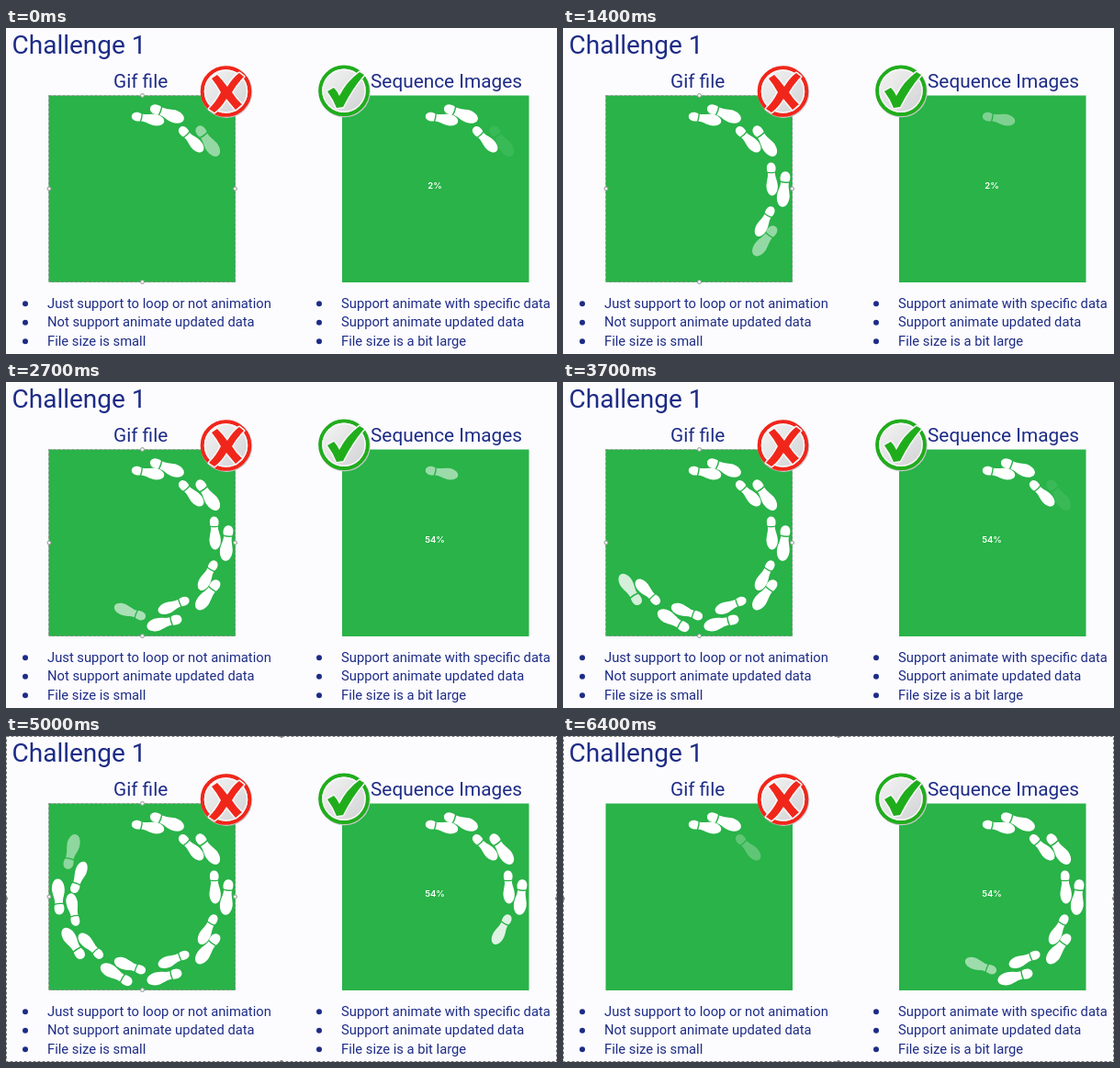
An HTML page that plays this animation: 600 px wide and 355 px high, repeating every 6.5 s.

```html
<!DOCTYPE html>
<html lang="en">
<head>
<meta charset="utf-8">
<title>Challenge 1</title>
<style>
  html, body { margin: 0; width: 100%; height: 100%; overflow: hidden; background: #fcfbfe; }
  svg { display: block; width: 600px; height: 355px; }
  text { font-family: Roboto, sans-serif; fill: #1d2c86; }
  .item { font-size: 14.75px; }
  .head { font-size: 20.8px; }
  .percent { font: 600 9.5px Inter, sans-serif; fill: #fff; text-anchor: middle; }
  .panel { fill: #29b348; }
  .select { fill: none; stroke-dasharray: 3 2; }
</style>
</head>
<body>
<svg viewBox="0 0 600 355">
  <defs>
    <g id="foot" fill="#fff">
      <path d="M-8.2-4.4C-12-6-18.4-5.2-18.5 0C-18.4 5-12 5.6-8.2 4.2Q-7.4 0-8.2-4.4Z"/>
      <path d="M-6.8-4.2C-2-4 2-6.8 8-6.8C14-6.8 18.5-4 18.5-.4C18.5 4 12 6.4 6.5 5.9C1 5.2-3 3.4-6.8 4Q-6-.2-6.8-4.2Z"/>
    </g>
    <linearGradient id="disc" x2="1" y2="1">
      <stop offset="0" stop-color="#f6f6f6"/>
      <stop offset="1" stop-color="#cfd0d2"/>
    </linearGradient>
    <path id="cross" d="M224 55L230 51Q236 57 241 64Q247 54 254 49L259 53Q251 61 246 70Q251 78 257 83L250 89Q245 83 240 77Q234 87 227 92L221 88Q229 80 234 70Q229 61 224 55Z"/>
    <path id="check" d="M350 69L357 65Q361 69 363 74Q371 58 385 48L390 51Q377 66 367 86L360 87Q356 77 350 69Z"/>
  </defs>

  <rect width="600" height="355" fill="#fcfbfe"/>
  <text x="6.5" y="28" font-size="28">Challenge 1</text>
  <text class="head" x="117" y="65">Gif file</text>
  <text class="head" x="397" y="65">Sequence Images</text>
  <g id="lists"></g>

  <rect class="panel" x="46.5" y="73.5" width="203.5" height="203.5"/>
  <rect class="panel" x="366" y="73.5" width="203.5" height="203.5"/>
  <g id="left"></g>
  <g id="right" transform="translate(320 0)"></g>
  <text id="percent" class="percent" x="467" y="174.5"></text>

  <g id="panelSelect" stroke="#8f9c92">
    <rect class="select" x="46.5" y="73.5" width="203" height="203"/>
    <g fill="#f4f4f4">
      <circle cx="148.5" cy="73.5" r="2"/><circle cx="148.5" cy="276.5" r="2"/>
      <circle cx="47" cy="175" r="2"/><circle cx="249.5" cy="175" r="2"/>
    </g>
  </g>

  <g id="badges"></g>

  <g id="stageSelect" stroke="#777">
    <rect class="select" x=".5" y=".5" width="599" height="354"/>
    <g fill="#777" stroke="none">
      <circle cx="0" cy="177" r="2"/><circle cx="600" cy="177" r="2"/>
      <circle cx="300" cy="0" r="2"/><circle cx="300" cy="355" r="2"/>
    </g>
  </g>
</svg>
<script>
const LOOP = 6500, STEP = 100, RESTART = 5850, UPDATE = 2650;
const byId = id => document.getElementById(id);

// Each print: centre x, centre y, walking direction in degrees
const prints = [
  [154.5, 99, 11], [175.5, 93, 20], [201.5, 121.5, 47], [220, 123, 54],
  [227, 164.5, 88], [241, 175.5, 95], [219.5, 210.5, 119], [220, 232, 126],
  [182.5, 243, 159], [172.5, 262.5, 165], [135, 250, 201], [120, 260, 210],
  [92.5, 228.5, 227], [73, 226, 237], [73.5, 189, 260], [57, 175, 266],
  [79.5, 154, 291], [71, 126, 284], [109, 109, 328], [112.5, 91, 338]
];

// [time, number of prints shown]; the fraction is the opacity of the newest print
const leftKeys = [[0, 3.5], [1400, 7.5], [2700, 10.6], [3700, 13.8], [4400, 15.8],
  [5600, 19.15], [RESTART, 20], [RESTART, .5], [6400, 2.25], [6500, 2.5]];
const rightKeys = [[0, 3.08], [975, .4], [UPDATE, .4], [3700, 3.08], [4400, 5.25],
  [5600, 8.45], [6400, 10.55], [6500, 10.8]];

function buildPrints(id) {
  byId(id).innerHTML = prints.map(([x, y, angle], i) => {
    const size = i % 2 ? "1.05 -1.08" : ".97 .97";
    return `<use href="#foot" transform="translate(${x} ${y}) rotate(${angle}) scale(${size})"/>`;
  }).join("");
  return [...byId(id).children];
}

function list(x, lines) {
  return lines.map((line, i) => {
    const y = 304.8 + i * 20.5;
    return `<circle cx="${x}" cy="${y - 4.5}" r="3" fill="#1d2c86"/>
      <text class="item" x="${x + 24}" y="${y}">${line}</text>`;
  }).join("");
}

function badge(x, y, color, mark) {
  return `<circle cx="${x + .6}" cy="${y + .8}" r="28.2" fill="#c9c9cb"/>
    <circle cx="${x}" cy="${y}" r="25.8" fill="url(#disc)" stroke="${color}" stroke-width="4"/>
    <circle cx="${x}" cy="${y}" r="23" fill="none" stroke="#f7f7f7" stroke-width="1.4"/>
    <use href="#${mark}" fill="${color}" stroke="#f8f8f8" stroke-width="3" stroke-linejoin="round"/>
    <use href="#${mark}" fill="${color}"/>`;
}

function valueAt(keys, t) {
  let i = keys.length - 2;
  while (i > 0 && keys[i][0] > t) i--;
  const [t0, a] = keys[i], [t1, b] = keys[i + 1];
  return a + (b - a) * (t - t0) / (t1 - t0);
}

function showPrints(feet, count) {
  feet.forEach((foot, i) => foot.setAttribute("opacity", Math.max(0, Math.min(1, count - i))));
}

byId("lists").innerHTML =
  list(21, ["Just support to loop or not animation", "Not support animate updated data", "File size is small"]) +
  list(341, ["Support animate with specific data", "Support animate updated data", "File size is a bit large"]);
byId("badges").innerHTML = badge(239.5, 69, "#f1261a", "cross") + badge(368, 68.3, "#20ad1c", "check");

const leftFeet = buildPrints("left"), rightFeet = buildPrints("right");
const start = performance.now();

function draw(now) {
  const elapsed = Math.max(0, now - start) % LOOP;
  const t = Math.floor(elapsed / STEP) * STEP;
  showPrints(leftFeet, valueAt(leftKeys, t));
  showPrints(rightFeet, valueAt(rightKeys, t));
  byId("percent").textContent = t < UPDATE ? "2%" : "54%";
  byId("panelSelect").style.display = t < RESTART ? "" : "none";
  byId("stageSelect").style.display = t < 4000 ? "none" : "";
  requestAnimationFrame(draw);
}
draw(start);
</script>
</body>
</html>
```
